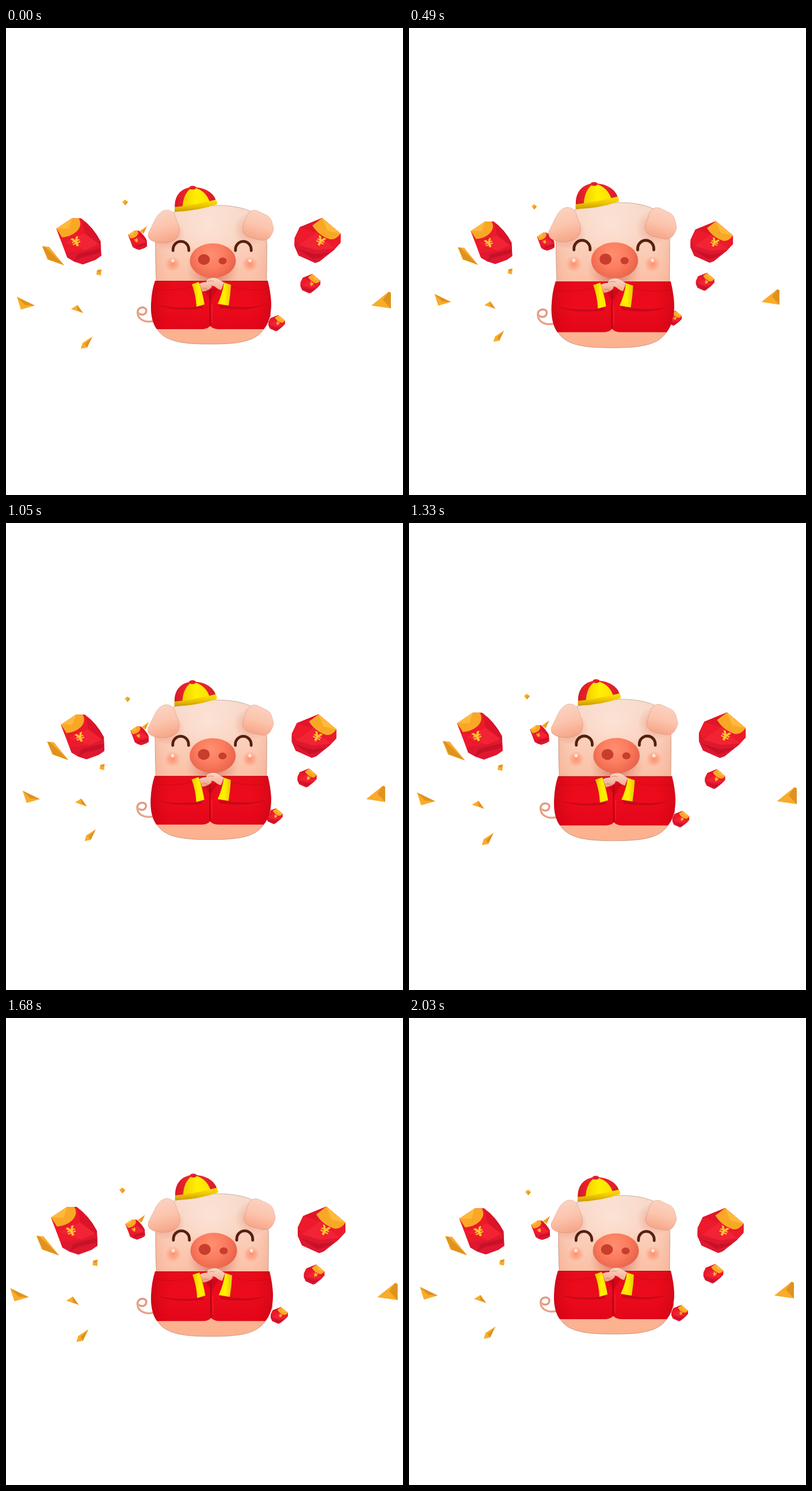
Recreate the animation shown at these times as an HTML page with a canvas. Size 690 px wide and 811 px high, loop 2.1 s.

```html
<!DOCTYPE html>
<html lang="en">
<head>
<meta charset="utf-8">
<title>New Year pig</title>
<style>
html, body { margin: 0; width: 100%; height: 100%; overflow: hidden; background: #fff; }
canvas { display: block; }
</style>
</head>
<body>
<canvas id="stage" width="690" height="811"></canvas>
<script>
const ctx = document.getElementById('stage').getContext('2d');
const LOOP = 2100, STEP = 70;

// Piecewise linear value at time t; keys are [time, value] pairs
function track(keys, t) {
  for (let i = 1; i < keys.length; i++) {
    const [t0, a] = keys[i - 1], [t1, b] = keys[i];
    if (t <= t1) return a + (b - a) * (t - t0) / (t1 - t0);
  }
  return keys[keys.length - 1][1];
}

function fill(d, color) {
  ctx.fillStyle = color;
  ctx.fill(new Path2D(d));
}

function line(d, color, width) {
  ctx.strokeStyle = color;
  ctx.lineWidth = width;
  ctx.stroke(new Path2D(d));
}

function ellipse(x, y, rx, ry, color, angle = 0) {
  ctx.fillStyle = color;
  ctx.beginPath();
  ctx.ellipse(x, y, rx, ry, angle, 0, 7);
  ctx.fill();
}

function addStops(g, colors) {
  colors.forEach((c, i) => g.addColorStop(i / (colors.length - 1), c));
  return g;
}
const linear = (x0, y0, x1, y1, ...colors) => addStops(ctx.createLinearGradient(x0, y0, x1, y1), colors);
const radial = (x, y, r, ...colors) => addStops(ctx.createRadialGradient(x, y, 0, x, y, r), colors);

function clipped(d, draw) {
  ctx.save();
  ctx.clip(new Path2D(d));
  draw();
  ctx.restore();
}

// Packet faces, about 80 units wide around their own origin: [path, colour]
const LEANS_LEFT = [
  ['M-39-22L-12-40 4-40Q25-25 38 0L39 25 29 32 7 40-8 35-20 28-29 4Z', '#d3142a'],
  ['M-39-22L0-40 8-36Q27-18 36 8L12 15-23 20-29 4Z', '#ec1a2b'],
  ['M-25 2L10-14 34 4 12 15Z', '#f12334'],
  ['M10-14L34 4Q27-18 6-36Z', '#dc1429'],
  ['M-23 20L12 15 38 6 39 25 29 32 7 40-8 35-20 28Z', '#df1730'],
  ['M-8 35L-2 22 38 12 37 20 4 28Z', '#c81127'],
  ['M-39-22L-12-40 0-40Q7-28-4-17Q-14-8-29-7Z', '#f9a825'],
  ['M-39-22L-12-40-18-22Z', '#ffb93a'],
];
const LEANS_RIGHT = [
  ['M8-39L40-12 40 4 28 17 4 36-4 39-33 26-40 10-40-4-31-23Z', '#d3142a'],
  ['M8-39L-31-23-40-4-33 8-2 17 30 14 40 2 40-12Z', '#ec1a2b'],
  ['M-33 8L-2-14 30 14-2 17Z', '#f12334'],
  ['M8-39L-31-23-2-14Z', '#e11529'],
  ['M-40 0L-33 8-2 17 30 14 4 36-4 39-33 26-40 10Z', '#df1730'],
  ['M-36 14L-4 24 22 21 4 30-8 32Z', '#c81127'],
  ['M8-39L40-12Q32-1 22-2Q2-8-9-26Z', '#f9a825'],
  ['M8-39L40-12 17-17Z', '#ffb93a'],
];

function packet(x, y, size, faces, tilt) {
  ctx.save();
  ctx.translate(x, y);
  ctx.scale(size, size);
  for (const [d, color] of faces) fill(d, color);
  ctx.rotate(tilt);
  ctx.fillStyle = '#ffc52e';
  ctx.font = 'bold 22px "DejaVu Sans", sans-serif';
  ctx.textAlign = 'center';
  ctx.textBaseline = 'middle';
  ctx.fillText('¥', tilt * 12, 1);
  ctx.restore();
}

// Gold shard: bright face, then a shaded face
function shard(light, dark) {
  fill(light, '#f9ab2a');
  fill(dark, '#df921e');
}

function scatter() {
  shard('M63 379L75 380 101 412 72 402Z', 'M63 379L68 380 101 412 74 402Z');
  shard('M19 467L50 482 26 489Z', 'M19 467L50 482 33 481Z');
  shard('M113 488L124 481 134 495Z', 'M124 481L134 495 124 490Z');
  shard('M150 536L141 555 130 557 133 547Z', 'M150 536L141 555 137 549Z');
  shard('M158 421L166 419 165 430 157 428Z', 'M158 421L166 419 162 425Z');
  shard('M202 302L207 298 212 302 207 308Z', 'M207 303L212 302 207 308Z');
  shard('M635 482L665 458 669 460 669 487Z', 'M665 458L669 460 669 487 655 472Z');
  shard('M245 344L232 353 239 357Z', 'M245 344L238 352 239 357Z');
  packet(126.5, 370.5, 1, LEANS_LEFT, -.4);
  packet(541.5, 369, 1, LEANS_RIGHT, .45);
  packet(228.7, 368.5, .42, LEANS_LEFT, -.4);
  packet(529, 444, .43, LEANS_RIGHT, .45);
  packet(470.5, 512.5, .36, LEANS_RIGHT, .45);
}

const BODY = 'M260 348C263 328 290 319 320 313C360 305 395 307 420 316C445 326 453 345 453.5 378L453 438 460 500 452 515C440 545 405 549 355 549C305 549 270 545 259 515L256 500 261 438Q259 390 260 348Z';
const LEFT_EAR = 'M248 355L261 329Q270 315 281 316Q290 317 294 326L301 347Q304 361 293 368Q279 376 261 372Q243 368 248 355Z';
const RIGHT_EAR = 'M412 346L419 325Q425 314 436 317L453 325Q461 329 463 340L465 348Q465 354 459 363Q452 372 437 367Q407 362 412 346Z';
const JACKET = 'M259 439L455 439Q460 458 461 478Q461 508 448 523L368 523Q358 522 355 517Q352 522 342 523L262 523Q251 508 252 480Q253 456 259 439Z';
const HAT = 'M293.5 312C292 291 305 277 324 276.5C345 276 361 286 365 300Z';

function head() {
  fill(BODY, linear(0, 308, 0, 549, '#f7dacb', '#fad2bf', '#fbc3a9', '#fdb593', '#fcb08e'));
  clipped(BODY, () => {
    ctx.fillStyle = linear(256, 0, 456, 0, 'rgba(240,150,120,.4)', 'rgba(250,205,185,0)',
      'rgba(250,215,195,0)', 'rgba(250,215,195,0)', 'rgba(250,205,185,0)', 'rgba(240,150,120,.35)');
    ctx.fillRect(250, 300, 215, 250);
    ellipse(352, 345, 75, 40, radial(352, 345, 75, 'rgba(255,240,230,.5)', 'rgba(255,235,225,0)'));
    ellipse(281, 358, 30, 26, radial(281, 358, 30, 'rgba(215,115,90,.5)', 'rgba(215,115,90,0)'));
    ellipse(425, 350, 30, 28, radial(425, 350, 30, 'rgba(215,115,90,.45)', 'rgba(215,115,90,0)'));
    ellipse(359, 420, 48, 32, radial(359, 420, 46, 'rgba(170,65,45,.8)', 'rgba(190,85,65,.35)', 'rgba(220,120,95,0)'));
  });
  line(BODY, 'rgba(110,65,50,.5)', .7);

  fill(LEFT_EAR, linear(267, 316, 283, 375, '#fad4c3', '#fcc4ac', '#f5a183'));
  line(LEFT_EAR, 'rgba(190,100,80,.4)', .7);
  fill(RIGHT_EAR, linear(445, 316, 430, 370, '#fad4c3', '#fcc4ac', '#f5a183'));
  line(RIGHT_EAR, 'rgba(190,100,80,.4)', .7);

  for (const x of [304, 412.5]) line(`M${x - 13.7} 386.5V384.5A13.7 13.8 0 0 1 ${x + 13.7} 384.5V386.5`, '#56200f', 4.8);
  for (const x of [290, 424]) {
    ellipse(x, 410, 15, 13, radial(x, 410, 14, 'rgba(255,125,90,.75)', 'rgba(255,140,105,.5)', 'rgba(255,150,120,0)'));
    ellipse(x, 404, 2.6, 2.8, '#ffe9df');
  }
  ellipse(359.5, 404, 40, 30, radial(356, 394, 46, '#ff8f70', '#fc7d5f', '#e8624a'));
  ellipse(344, 402, 10.3, 9.3, '#c73e2d');
  ellipse(376.5, 404.5, 7, 6, '#c73e2d');
}

function hat() {
  fill(HAT, '#ee2430');
  clipped(HAT, () => {
    ctx.fillStyle = linear(294, 0, 364, 0, 'rgba(130,0,10,.25)', 'rgba(255,40,40,0)', 'rgba(130,0,10,.25)');
    ctx.fillRect(290, 275, 80, 40);
  });
  fill('M307 310Q308 288 322 278L330 278Q348 284 354 302Z', linear(307, 0, 354, 0, '#f2ce00', '#fff000', '#fbe000'));
  ellipse(324.5, 277.3, 6, 3.3, '#e21f2c');
  fill('M293 311Q331 307 365 298Q367 301 367 306Q333 318 293 319Z', linear(0, 299, 0, 319, '#ffdf10', '#edc500', '#ca9800'));
}

function jacket() {
  fill(JACKET, linear(0, 439, 0, 523, '#e70b1b', '#ec0b1c', '#e2061a'));
  clipped(JACKET, () => {
    ctx.fillStyle = linear(252, 0, 461, 0, 'rgba(140,0,15,.3)', 'rgba(255,0,0,0)', 'rgba(255,0,0,0)',
      'rgba(255,0,0,0)', 'rgba(255,0,0,0)', 'rgba(140,0,15,.25)');
    ctx.fillRect(250, 435, 215, 90);
    fill('M345 456L370 450 356 472Z', '#d00818');
    fill('M262 480Q290 493 341 487L342 483 325 485Q290 488 262 480Z', '#c40819');
    fill('M451 480Q425 493 372 486L370 481 386 483Q425 488 451 480Z', '#c40819');
    line('M260 453Q295 458 324 449M453 453Q420 458 391 449', 'rgba(190,0,20,.35)', 1.5);
    line('M355 456Q354 490 355 518', '#a90617', 2);
    line('M358 480V512', 'rgba(255,60,60,.4)', 1.5);
  });
  line('M259 439.5H455', 'rgba(120,15,15,.4)', 1);
  fill('M323 445L335 441Q342 461 345 480L331 484Q330 463 323 445Z', linear(324, 0, 345, 0, '#e6c600', '#fff000', '#ffe600'));
  fill('M379 442L391 446Q390 464 387 482L368 479Q376 462 379 442Z', linear(368, 0, 391, 0, '#ffe600', '#fff000', '#e6c600'));
  fill('M336 444Q344 440 352 442L358 449Q354 456 341 458Z', linear(0, 441, 0, 457, '#fbcdb8', '#ea9c82'));
  fill('M379 442L374 455Q368 454 363 449Q358 446 353 449Q345 444 350 437Q360 431 369 436Z', linear(0, 433, 0, 455, '#fcd8c7', '#f3ab92'));
  line('M351 440Q356 438 361 440M342 452Q348 451 351 455', 'rgba(200,100,80,.6)', 1);
}

function pig() {
  line('M255 509C240 512 230 505 229 496C227 483 243 483 244 490C244 498 236 500 230 495', '#e39a80', 3.4);
  line('M255 508C240 511 231 504 230 495', '#f7c0aa', 1.2);
  head();
  hat();
  jacket();
}

// The pig swells twice; the second swell leans right
const first = [[0, 0], [540, 1], [1120, 0], [LOOP, 0]];
const second = [[0, 0], [1120, 0], [1540, 1], [2030, 0], [LOOP, 0]];
const spread = [[0, 1], [630, .9], [1540, 1.05], [2030, 1], [LOOP, 1]];

function draw(now) {
  const t = Math.floor(now % LOOP / STEP) * STEP;
  ctx.fillStyle = '#fff';
  ctx.fillRect(0, 0, 690, 811);
  ctx.lineCap = 'round';

  ctx.save();
  const s = track(spread, t);
  ctx.translate(344.5, 402);
  ctx.scale(s, s);
  ctx.translate(-344.5, -402);
  scatter();
  ctx.restore();

  ctx.save();
  const a = track(first, t), b = track(second, t);
  ctx.transform(1 + .023 * a + .02 * b, 0, 0, 1 + .052 * a + .04 * b, -10.6 * a - 4.9 * b, -21.5 * a - 16.3 * b);
  pig();
  ctx.restore();
}

const start = performance.now();
function tick() {
  draw(performance.now() - start);
  requestAnimationFrame(tick);
}
tick();
</script>
</body>
</html>
```
